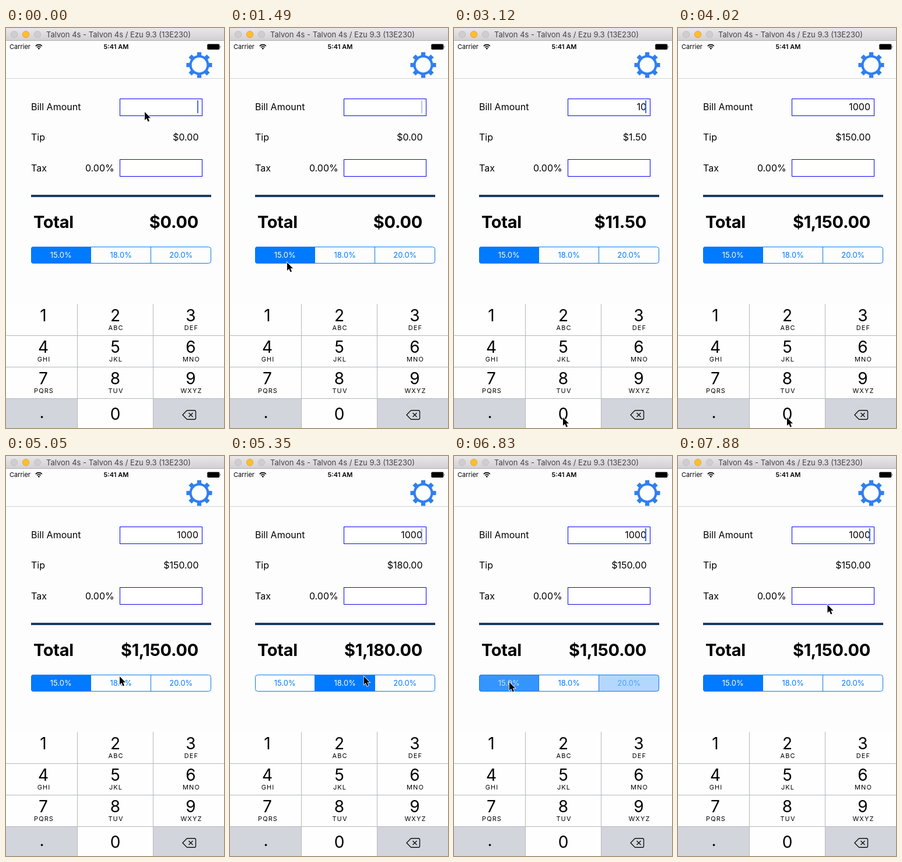
Recreate the animation shown at these times as an HTML page. Size 374 by 686 pixels, loop 8 s.

```html
<!DOCTYPE html>
<html lang="en">
<head>
<meta charset="utf-8">
<title>Tip calculator</title>
<style>
html, body { margin: 0; width: 100%; height: 100%; overflow: hidden; background: #fdfdfd; }
svg { display: block; width: 374px; height: 686px; font-family: Inter, Roboto, sans-serif; font-size: 16px; }
.end { text-anchor: end; }
.mid { text-anchor: middle; }
.total { font-size: 29px; font-weight: 700; letter-spacing: -.3px; }
.digit { font-size: 28px; }
.letters { font-size: 11px; letter-spacing: 1.1px; }
.segment { font-size: 13px; }
</style>
</head>
<body>
<svg id="stage" viewBox="0 0 374 686" xmlns="http://www.w3.org/2000/svg">
  <defs>
    <linearGradient id="bar" x2="0" y2="1">
      <stop stop-color="#e9e7e9"/><stop offset="1" stop-color="#d1cfd1"/>
    </linearGradient>
    <clipPath id="pill"><rect x="43" y="375" width="309" height="29" rx="4"/></clipPath>
  </defs>
  <rect width="374" height="686" fill="#fdfdfd"/>

  <rect width="374" height="22" fill="url(#bar)"/>
  <path d="M0 21.5H374" stroke="#b4b2b4"/>
  <g stroke-width=".8">
    <circle cx="14" cy="11" r="5.7" fill="#cfcdcf" stroke="#bdbbbd"/>
    <circle cx="34" cy="11" r="5.7" fill="#fdbd2e" stroke="#e0a32a"/>
    <circle cx="54" cy="11" r="5.7" fill="#cfcdcf" stroke="#bdbbbd"/>
  </g>
  <text x="69" y="16" font-size="13" fill="#444">Talvon 4s - Talvon 4s / Ezu 9.3 (13E230)</text>

  <text x="6" y="36" font-size="11">Carrier</text>
  <g fill="none" stroke="#000" stroke-width="1.6">
    <path d="M50.8 30.8A8 8 0 0 1 61.8 30.8M53 33.2A4.8 4.8 0 0 1 59.6 33.2"/>
  </g>
  <path d="M54.4 34.8A2.8 2.8 0 0 1 58.2 34.8L56.3 37Z"/>
  <text class="mid" x="189" y="36" font-size="11" font-weight="600">5:41 AM</text>
  <rect x="345.3" y="27.5" width="21" height="9.5" rx="1.8"/>
  <path d="M367 30.6Q368.8 32.3 367 34Z"/>

  <path d="M0 86.5H374" stroke="#d2d2d4"/>
  <g id="gear" transform="translate(331.5 63.5)" fill="#2f7ff0">
    <circle r="15" fill="none" stroke="#2f7ff0" stroke-width="4.2"/>
  </g>

  <text x="43" y="141">Bill Amount</text>
  <text x="43" y="192.5">Tip</text>
  <text x="43" y="245.5">Tax</text>
  <text class="end" x="185.7" y="245.5">0.00%</text>
  <g fill="#fff" stroke="#0505f0">
    <rect x="195.5" y="121.5" width="141" height="29"/>
    <rect x="195.5" y="225.5" width="141" height="29"/>
  </g>
  <text class="end" id="bill" x="330" y="141"></text>
  <rect id="caret" x="328" y="124" width="2" height="22" fill="#3f6fe0"/>
  <text class="end" id="tip" x="330.5" y="193"></text>
  <rect x="43" y="286" width="309" height="4" fill="#1b3a62"/>
  <text class="total" x="47" y="342.5">Total</text>
  <text class="total end" id="total" x="330" y="342.5"></text>

  <g id="segments" clip-path="url(#pill)"></g>
  <g fill="none" stroke="#0a78f0">
    <rect x="43.5" y="375.5" width="308" height="28" rx="4"/>
    <path d="M145.5 375V404M248.5 375V404"/>
  </g>

  <g id="keypad">
    <rect y="473" width="374" height="213" fill="#fefefe"/>
    <rect id="zeroKey" x="123" y="636" width="129" height="50" fill="#d2d5db"/>
    <path d="M0 636H122V686H0ZM253 636H374V686H253Z" fill="#d2d5db"/>
    <path d="M0 527.5H374M0 581.5H374M0 635.5H374M122.5 473V686M252.5 473V686" stroke="#b5b7bb"/>
    <g fill="none" stroke="#111" stroke-width="1.4" stroke-linejoin="round">
      <path d="M303 663.5L309.5 656.8Q310.5 655.7 312 655.7H323Q325.5 655.7 325.5 658V669Q325.5 671.3 323 671.3H312Q310.5 671.3 309.5 670.2Z"/>
      <path d="M313.5 660L320.5 667M320.5 660L313.5 667"/>
    </g>
  </g>

  <path id="cursor" d="M0 0V14L3.2 11.1L5.6 16.6L8 15.5L5.7 10.2H10Z" stroke="#fff" stroke-width="1.6" paint-order="stroke"/>
</svg>
<script>
const LOOP = 8000, STEP = 148.4;
const byId = id => document.getElementById(id);

function add(parent, tag, attrs, text = '') {
  const node = document.createElementNS('http://www.w3.org/2000/svg', tag);
  for (const name in attrs) node.setAttribute(name, attrs[name]);
  node.textContent = text;
  return parent.appendChild(node);
}

for (let k = 0; k < 8; k++) {
  add(byId('gear'), 'path', { d: 'M-3.6 -16V-22H3.6V-16Z', transform: `rotate(${k * 45})` });
}

const columns = [64, 187.5, 317];
['', 'ABC', 'DEF', 'GHI', 'JKL', 'MNO', 'PQRS', 'TUV', 'WXYZ'].forEach((letters, k) => {
  const x = columns[k % 3], y = 503 + 54 * Math.floor(k / 3);
  add(byId('keypad'), 'text', { class: 'digit mid', x, y }, k + 1);
  add(byId('keypad'), 'text', { class: 'letters mid', x: x + 1, y: y + 15 }, letters);
});
add(byId('keypad'), 'text', { class: 'digit mid', x: 187.5, y: 672 }, '0');
add(byId('keypad'), 'text', { class: 'digit mid', x: 61.5, y: 669 }, '.');

const rates = [15, 18, 20];
const segments = rates.map((rate, k) => ({
  fill: add(byId('segments'), 'rect', { x: 43 + 103 * k, y: 375, width: 103, height: 29, fill: '#007aff' }),
  label: add(byId('segments'), 'text', { class: 'segment mid', x: 94.3 + 103 * k, y: 394 }, rate.toFixed(1) + '%')
}));

// Pointer stops: step, x, y
const pointer = [
  [0, 238, 144], [6, 238, 144], [8, 160, 290], [10, 98, 402], [11, 76, 495], [15, 76, 495],
  [17, 110, 570], [20, 187, 668], [28, 187, 668], [29, 184, 640], [32, 188, 440], [34, 195, 378],
  [35, 195, 378], [38, 299, 378], [40, 299, 378], [44, 95, 388], [47, 95, 388],
  [51, 275, 239], [52, 275, 239], [53, 256.5, 255], [60, 256.5, 255]
];
const typed = [[0, ''], [14, '1'], [21, '10'], [22, '100'], [23, '1000']];
const choices = [[0, 0], [35, 1], [40, 2], [46, 0]];

const latest = (list, step) => list.findLast(entry => entry[0] <= step);
const money = value => '$' + value.toLocaleString('en-US', { minimumFractionDigits: 2, maximumFractionDigits: 2 });

function pointerAt(step) {
  const next = pointer.findIndex(stop => stop[0] > step);
  const [s0, x0, y0] = pointer[next - 1], [s1, x1, y1] = pointer[next];
  const u = (step - s0) / (s1 - s0);
  return [x0 + (x1 - x0) * u, y0 + (y1 - y0) * u];
}

// The caret stays solid for three steps after a key, then blinks
function caretAt(step) {
  const phase = step - latest(typed, step)[0] - 3;
  return phase < 0 ? 1 : [.4, 0, 0, .5, 1, 1, 1][phase % 7];
}

function draw(time) {
  const step = Math.floor((time % LOOP) / STEP);
  const [x, y] = pointerAt(step);
  byId('cursor').setAttribute('transform', `translate(${x} ${y})`);
  byId('caret').setAttribute('opacity', caretAt(step));
  byId('zeroKey').setAttribute('opacity', step === 22 ? 1 : 0);

  const bill = latest(typed, step)[1];
  const choice = latest(choices, step);
  const previous = choices[choices.indexOf(choice) - 1];
  const fading = previous && step === choice[0];
  const tip = bill * rates[choice[1]] / 100;
  byId('bill').textContent = bill;
  byId('tip').textContent = money(tip);
  byId('total').textContent = money(+bill + tip);

  segments.forEach(({ fill, label }, k) => {
    let level = k === choice[1] ? 1 : 0;
    if (fading) level = level ? .79 : k === previous[1] ? .29 : 0;
    fill.setAttribute('opacity', level);
    label.setAttribute('fill', `rgb(${255 * level},${122 + 133 * level},255)`);
  });
}

const start = performance.now();
function tick() {
  draw(performance.now() - start);
  requestAnimationFrame(tick);
}
tick();
</script>
</body>
</html>
```
